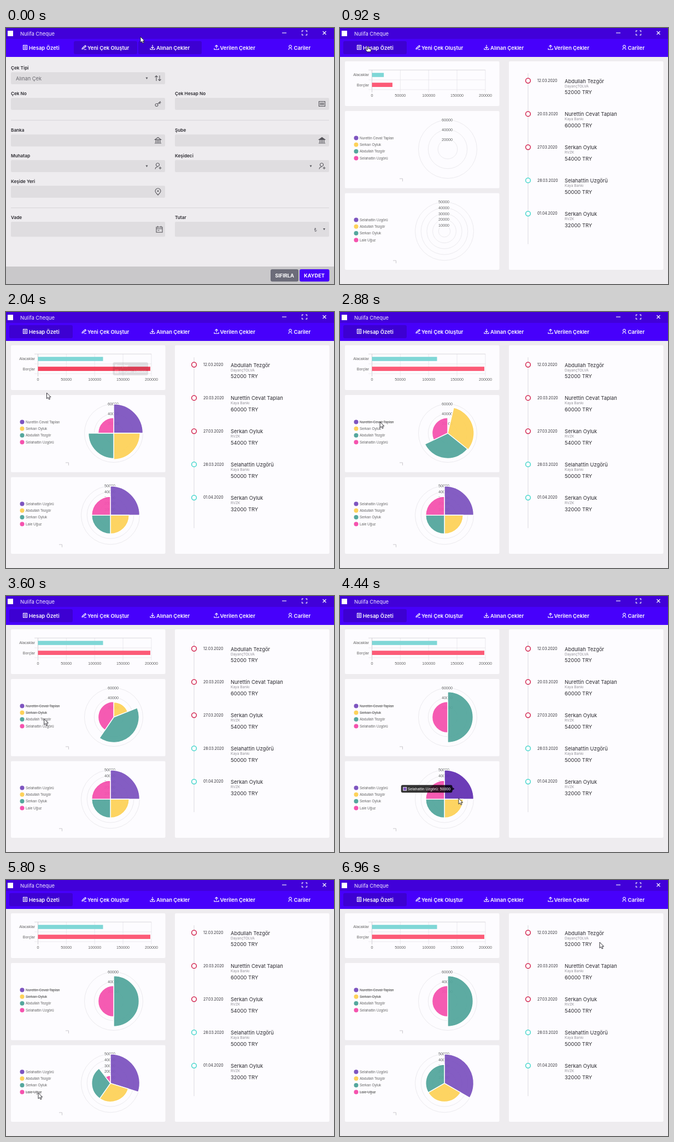
An HTML page for the animation above (7 s loop, 600 px wide and 469 px high).

```html
<!DOCTYPE html>
<html lang="tr">
<head>
<meta charset="utf-8">
<title>Nulifa Cheque</title>
<style>
html, body { margin: 0; width: 100%; height: 100%; overflow: hidden; background: #eeecef; }
svg { display: block; width: 100vw; height: 100vh; }
text { font-family: Inter, sans-serif; fill: #2b2a30; white-space: pre; }
.title { font-size: 9.4px; fill: #f1ecff; }
.nav { font-size: 9.5px; font-weight: 600; fill: #fff; }
.label { font-size: 8.2px; font-weight: 600; }
.value { font-size: 9.3px; fill: #6b6a70; }
.btn { font-size: 9.2px; font-weight: 700; fill: #fff; }
.name { font-size: 9.4px; }
.bank { font-size: 6.6px; fill: #929097; }
.date { font-size: 6.9px; }
.axis, .legend, .tip { font-family: "Liberation Sans", Arial, sans-serif; fill: #666; }
.axis { font-size: 7.2px; }
.legend { font-size: 6.5px; }
.legend.off { text-decoration: line-through; }
.tip { font-size: 6.95px; fill: #fff; }
.mid { text-anchor: middle; }
.end { text-anchor: end; }
.ico { fill: none; stroke: #55545a; stroke-width: 1.1; }
.white { stroke: #fff; }
.grid { fill: none; stroke: #e2e1e5; stroke-width: .7; }
</style>
</head>
<body>
<svg id="stage" viewBox="0 0 600 469" preserveAspectRatio="none"></svg>
<script>
const LOOP = 7000, SWITCH = 920;
const PURPLE = '#7e55c0', YELLOW = '#fdd25a', TEAL = '#55a79d', PINK = '#f553ae';
const COLORS = [PURPLE, YELLOW, TEAL, PINK];
const HOVER = ['#6532b4', '#ffc928', '#3c998d', '#f62c9d'];
const LONG = 'Nurettin Cevat Taplan', SERKAN = 'Serkan Oyluk',
  ABDULLAH = 'Abdullah Tezgör', SELO = 'Selahattin Uzgörü', LALE = 'Lale Uğuz';

const text = (x, y, s, cls, more = '') => `<text x="${x}" y="${y}" class="${cls}" ${more}>${s}</text>`;
const rect = (x, y, w, h, fill, rx = 0, more = '') =>
  `<rect x="${x}" y="${y}" width="${w}" height="${h}" fill="${fill}" rx="${rx}" ${more}/>`;
const icon = (x, y, d, more = '') => `<path class="ico" transform="translate(${x} ${y})" d="${d}" ${more}/>`;
const range = n => [...Array(n).keys()];

// Icons, centred on 0,0
const ICON = {
  doc: 'M-3.5-4H3.5V4H-3.5ZM-2-2H2M-2 0H2M-2 2H2',
  pen: 'M-3.5 1.5L2-3.5 3.5-2-2 3-4 3.2ZM0 4H4',
  down: 'M0-4.5V2M-2.5-.5L0 2 2.5-.5M-4 1.5V4H4V1.5',
  up: 'M0 2V-4M-2.5-1.5L0-4 2.5-1.5M-4 1.5V4H4V1.5',
  man: 'M0-4A2.3 2.3 0 1 1-.01-4M-3 4.5Q-2.5 1 0 1T3 4.5',
  swap: 'M-3 5V-4.5M-5.5-2L-3-4.5-.5-2M3-5V4.5M.5 2L3 4.5 5.5 2',
  key: 'M-2.5-.5A2.5 2.5 0 1 1-2.51-.5M-.8 .3L4.5-4.5M2-2L4 0M3.5-3.7L5.3-2',
  code: 'M-5.5-4.5H5.5V4.5H-5.5ZM-3-2.5V2.5M-1-2.5V2.5M1-2.5V2.5M3-2.5V2.5',
  bank: 'M-5.5-1.5L0-5.5 5.5-1.5ZM-4-1V4M-1.3-1V4M1.3-1V4M4-1V4M-6 5H6',
  add: 'M-.5-5.5A3 3 0 1 1-.51-5.5M-5 5.5Q-4.5 1.5-.5 1.5M4 1V6M1.5 3.5H6.5',
  pin: 'M0 6Q-5 1-5-1.2A5 5 0 0 1 5-1.2Q5 1 0 6ZM0-2.2A1 1 0 1 1-.01-2.2',
  date: 'M-5.5-4H5.5V5.5H-5.5ZM-5.5-1H5.5M-3-6V-3M3-6V-3M-3 2H0'
};

function header() {
  const tabs = [[35, 42, 'doc', 'Hesap Özeti'], [143, 149, 'pen', 'Yeni Çek Oluştur'], [268, 275, 'down', 'Alınan Çekler'],
    [385, 391.5, 'up', 'Verilen Çekler'], [520, 526.5, 'man', 'Cariler']];
  return rect(0, 0, 600, 53, '#4700fb') + rect(0, 0, 600, 20, '#4100d9') +
    rect(3, 5, 10, 10, '#fff') + text(26, 13.6, 'Nulifa Cheque', 'title') +
    icon(509, 9, 'M-4 0H4', 'style="stroke:#fff"') +
    icon(546, 9, 'M-4.5-1.5V-4H-2M2-4H4.5V-1.5M4.5 1.5V4H2M-2 4H-4.5V1.5', 'style="stroke:#fff"') +
    icon(582.5, 9, 'M-3-3L3 3M3-3L-3 3', 'style="stroke:#fff"') +
    range(3).map(i => rect(6 + 118 * i, 24, 116, 24, '#3d00d2', 3, `id="tab${i}"`)).join('') +
    tabs.map(([ix, x, ic, s]) => icon(ix, 35.5, ICON[ic], 'style="stroke:#fff"') + text(x, 40, s, 'nav')).join('');
}

function form() {
  const fields = [
    [9, 81, 22, 'Çek Tipi', 'swap', 1], [9, 128, 22, 'Çek No', 'key'], [309, 128, 22, 'Çek Hesap No', 'code'],
    [9, 195, 22, 'Banka', 'bank'], [309, 195, 22, 'Şube', 'bank'], [9, 242, 22, 'Muhatap', 'add', 1],
    [309, 242, 22, 'Keşideci', 'add', 1], [9, 289, 22, 'Keşide Yeri', 'pin'],
    [9, 355, 27.5, 'Vade', 'date'], [309, 355, 27.5, 'Tutar']];
  const caret = (x, y) => `<path d="M${x - 2} ${y - 1.5}h4l-2 3.5z" fill="#55545a"/>`;
  return fields.map(([x, y, h, s, ic, drop]) =>
    text(x, y - 5, s, 'label') + rect(x, y, 282, h, '#dfdde0', 2) +
    (ic ? icon(x + (ic === 'date' ? 271.5 : 269), y + h / 2, ICON[ic],
      x > 300 && ic === 'bank' ? 'style="fill:#55545a"' : '') : '') +
    (drop ? caret(x + 248.5, y + 11) : '')).join('') +
    text(18, 95.5, 'Alınan Çek', 'value') + text(563.5, 372.5, '₺', 'value') + caret(582, 368.5) +
    rect(9, 168.5, 582, 1, '#d6d4d8') + rect(9, 329, 582, 1, '#d6d4d8') +
    rect(0, 437, 600, 32, '#c9c8ca') +
    rect(484, 442, 51, 22.5, '#6c6c79', 3) + text(509.5, 456.8, 'SIFIRLA', 'btn mid') +
    rect(537, 442, 54.5, 22.5, '#4700fb', 3) + text(564, 456.8, 'KAYDET', 'btn mid');
}

// Polar charts: values per slice, clicks = [time, slice hidden]
const charts = [
  { x: 197, y: 222, max: 60000, step: 20000, top: 201.5, corner: [109, 276], values: [60000, 54000, 52000, 32000],
    names: [LONG, SERKAN, ABDULLAH, SELO], clicks: [[2500, 0], [3470, 1]] },
  { x: 191, y: 372.3, max: 50000, step: 10000, top: 351.5, corner: [97, 426], values: [50000, 32000, 32000, 32000],
    names: [SELO, ABDULLAH, SERKAN, LALE], clicks: [[5605, 3]] }
];
const RADIUS = 53.5;

function polar(c, k) {
  const rings = range(c.max / c.step).map(i => RADIUS * (i + 1) * c.step / c.max);
  return rings.map(r => `<circle class="grid" cx="${c.x}" cy="${c.y}" r="${r}"/>`).join('') +
    rings.map((r, i) => rect(c.x - 12, c.y - r - 4.5, 22, 9, '#fdfcff', 0, 'opacity=".75"') +
      text(c.x - 1, c.y - r + 2.4, (i + 1) * c.step, 'axis mid')).join('') +
    c.names.map((s, i) => `<circle cx="29.5" cy="${c.top + 12.3 * i}" r="4" fill="${COLORS[i]}"/>` +
      text(36, c.top + 12.3 * i + 2.2, s, 'legend', `id="leg${k}${i}"`) +
      `<path id="arc${k}${i}" stroke="#fff" stroke-width="1.4" fill-opacity=".95"/>`).join('') +
    `<path d="M${c.corner}h5.5v5" fill="none" stroke="#c9c7cc" stroke-width="1"/>`;
}

function dashboard() {
  const ticks = range(5).map(i => 58.5 + 51.85 * i);
  const rows = [['12.03.2020', ABDULLAH, 'DayançTOLVA', 52000], ['20.03.2020', LONG, 'Kaya Bankı', 60000],
    ['27.03.2020', SERKAN, 'RVZK', 54000], ['28.03.2020', SELO, 'Kaya Bankı', 50000],
    ['01.04.2020', SERKAN, 'RVZK', 32000]];
  const cards = [[9, 61, 82], [9, 152, 141.5], [9, 302.5, 140.5], [309, 61, 382]];
  return cards.map(([x, y, h]) => rect(x, y, 282.5, h, '#fdfcff', 2)).join('') +
    ticks.map((x, i) => `<path class="grid" d="M${x} 77V118" ${i ? '' : 'style="stroke:#bcbabf"'}/>` +
      text(x, 126, i * 50000, 'axis mid')).join('') +
    [77, 95, 113].map(y => `<path class="grid" d="M52 ${y}H266" ${y === 77 ? 'style="stroke:#c9c7cc"' : ''}/>`).join('') +
    text(53, 88.3, 'Alacaklar', 'axis end', 'style="font-size:7px"') +
    text(53, 106.5, 'Borçlar', 'axis end', 'style="font-size:7px"') +
    rect(58.5, 82.2, 0, 7.6, '#7fd7d6', 0, 'id="bar0"') + rect(58.5, 100.2, 0, 7.8, '#fc5b77', 0, 'id="bar1"') +
    charts.map(polar).join('') + rect(343.5, 83, 1, 313, '#dcdadf') +
    rows.map(([date, name, bank, sum], i) => {
      const y = 96.5 + 60.9 * i;
      return `<circle cx="344" cy="${y}" r="4.4" fill="#fdfcff" stroke="${i < 3 ? '#d3254f' : '#45d6cc'}" stroke-width="1.5"/>` +
        text(361, y + 2.3, date, 'date') + text(411, y + 4, name, 'name') +
        text(411, y + 12, bank, 'bank') + text(411, y + 24.6, sum + ' TRY', 'name');
    }).join('');
}

const stage = document.getElementById('stage');
stage.innerHTML = rect(0, 0, 600, 469, '#eeecef') + header() +
  `<g id="form">${form()}</g><g id="dash">${dashboard()}</g>
  <g id="tip"><path id="tipBox" fill="#000" fill-opacity=".8"/>
    <text id="tipTitle" class="tip" font-weight="700"></text>
    <rect id="tipKey" width="6" height="6" stroke="#fff" stroke-width=".8"/>
    <text id="tipText" class="tip"></text></g>
  <g id="cursor" fill="#fff" stroke="#1c1b22" stroke-width=".9" stroke-linejoin="round">
    <path id="arrow" d="M0 0V10.6L2.5 8.4 4.2 12 6 11.2 4.4 7.7H7.6Z"/>
    <path id="hand" d="M-1 1Q0-.5 1 1V4.5L5 5.3Q6 5.6 5.8 7L5 10.5H-1.5L-4.5 6.5Q-4.5 5-3 5.5L-1 7Z"/></g>`;
const $ = id => document.getElementById(id);

const clamp = v => Math.min(1, Math.max(0, v));
const lerp = (a, b, p) => a + (b - a) * p;
const easeOut = v => 1 - (1 - clamp(v)) ** 4;

function layout(c, hidden) {
  const turn = 2 * Math.PI / (4 - hidden.length);
  let a = 0;
  return c.values.map((v, i) => {
    const off = hidden.includes(i), from = a;
    if (!off) a += turn;
    return [from, a, off ? 0 : RADIUS * v / c.max];
  });
}

function slices(c, t) {
  const hidden = [];
  let state = c.values.map(() => [0, 0, 0]);
  for (const [at, slice] of [[SWITCH, -1], ...c.clicks]) {
    if (t < at) break;
    if (slice >= 0) hidden.push(slice);
    const goal = layout(c, hidden), p = easeOut((t - at) / 1000);
    state = state.map((s, i) => s.map((v, j) => lerp(v, goal[i][j], p)));
  }
  return state;
}

function wedge(x, y, [a, b, r]) {
  if (r < .1 || b - a < .002) return '';
  const at = q => `${x + r * Math.sin(q)} ${y - r * Math.cos(q)}`;
  return `M${x} ${y}L${at(a)}A${r} ${r} 0 ${b - a > Math.PI ? 1 : 0} 1 ${at(b)}Z`;
}

// Hover spans: start, end, anchor, label, colour, hovered part, title
const hovers = [
  [1540, 1880, 264, 104, 'Borçlar: 198000', '#fc5b77', 'bar1', 'Borçlar'],
  [4120, 4450, 209.5, 353.3, SELO + ': 50000', PURPLE, 'arc10'],
  [4450, 4690, 203, 384.4, ABDULLAH + ': 32000', YELLOW, 'arc11'],
  [4690, 4910, 179, 384.4, SERKAN + ': 32000', TEAL, 'arc12']
];

function drawTip(t) {
  const i = hovers.findLastIndex(h => t >= h[0]);
  const h = hovers[i], prev = hovers[i - 1];
  if (!h || t > h[1] + 400) { $('tip').style.opacity = 0; return; }
  const [start, end, ax, ay, label, color, , title] = h;
  const follows = prev && prev[1] === start, p = easeOut((t - start) / 400);
  const x = follows ? lerp(prev[2], ax, p) : ax, y = follows ? lerp(prev[3], ay, p) : ay;
  $('tipText').textContent = label;
  $('tipTitle').textContent = title || '';
  const w = $('tipText').getComputedTextLength() + 15.5, half = title ? 12 : 7;
  const left = x - 4 - w, row = title ? y + 5 : y;
  $('tipBox').setAttribute('d', `M${left + 3} ${y - half}h${w - 6}q3 0 3 3V${y - 3}L${x} ${y}L${x - 4} ${y + 3}V${y + half - 3}` +
    `q0 3-3 3h${6 - w}q-3 0-3-3V${y - half + 3}q0-3 3-3Z`);
  const place = (id, dx, py) => { $(id).setAttribute('x', left + dx); $(id).setAttribute('y', py); };
  place('tipTitle', 4, y - 3);
  place('tipKey', 4, row - 3);
  place('tipText', 12, row + 2.4);
  $('tipKey').setAttribute('fill', color);
  $('tip').style.opacity = t > end ? 1 - easeOut((t - end) / 400) : follows ? 1 : p;
}

// Pointer stops: time, x, y
const path = [[0, 246, 16], [40, 246, 16], [160, 235, 14], [360, 130, 30], [600, 51, 33], [920, 51, 33], [1100, 60, 50],
  [1400, 110, 90], [1560, 120, 104], [1840, 110, 104], [2040, 74.5, 148], [2360, 76, 196], [2700, 76, 198],
  [3080, 70, 205], [3300, 68, 212], [3480, 68, 212], [3600, 69.5, 225], [3800, 112, 262], [4100, 186, 322],
  [4250, 212, 345], [4440, 217, 370.5], [4560, 212, 388], [4800, 172, 388], [5000, 125, 392], [5200, 78, 392],
  [5400, 59, 390], [6240, 59, 390], [6440, 110, 290], [6640, 195, 122], [6800, 360, 112], [6920, 475, 114], [7000, 475, 114]];

function drawCursor(t) {
  const i = path.findIndex(p => p[0] > t), a = path[i - 1], b = path[i];
  const p = (t - a[0]) / (b[0] - a[0]), x = lerp(a[1], b[1], p), y = lerp(a[2], b[2], p);
  const hand = y > 24 && y < 48;
  $('cursor').setAttribute('transform', `translate(${x} ${y})`);
  $('arrow').style.opacity = hand ? 0 : 1;
  $('hand').style.opacity = hand ? 1 : 0;
}

function draw(t) {
  const dash = t >= SWITCH;
  $('form').style.display = dash ? 'none' : '';
  $('dash').style.display = dash ? '' : 'none';
  $('tab0').style.opacity = dash ? 1 : clamp((t - 380) / 200);
  $('tab1').style.opacity = dash ? 0 : 1;
  $('tab2').style.opacity = dash ? 0 : 1 - clamp((t - 120) / 200);

  const hot = hovers.find(h => t >= h[0] && t < h[1]);
  const grow = easeOut((t - 872) / 1000);
  $('bar0').setAttribute('width', 119 * grow);
  $('bar1').setAttribute('width', 205.5 * grow);
  $('bar1').setAttribute('fill', t > 1540 && t < 2100 ? '#f4455f' : '#fc5b77');
  charts.forEach((c, k) => {
    slices(c, t).forEach((s, i) => {
      const id = `arc${k}${i}`, on = hot && hot[6] === id;
      $(id).setAttribute('d', wedge(c.x, c.y, s));
      $(id).setAttribute('fill', on ? HOVER[i] : COLORS[i]);
    });
    c.clicks.forEach(([at, i]) => $(`leg${k}${i}`).classList.toggle('off', t >= at));
  });
  drawTip(t);
  drawCursor(t);
}

const begin = performance.now();
function tick() {
  draw((performance.now() - begin) % LOOP);
  requestAnimationFrame(tick);
}
tick();
</script>
</body>
</html>
```
